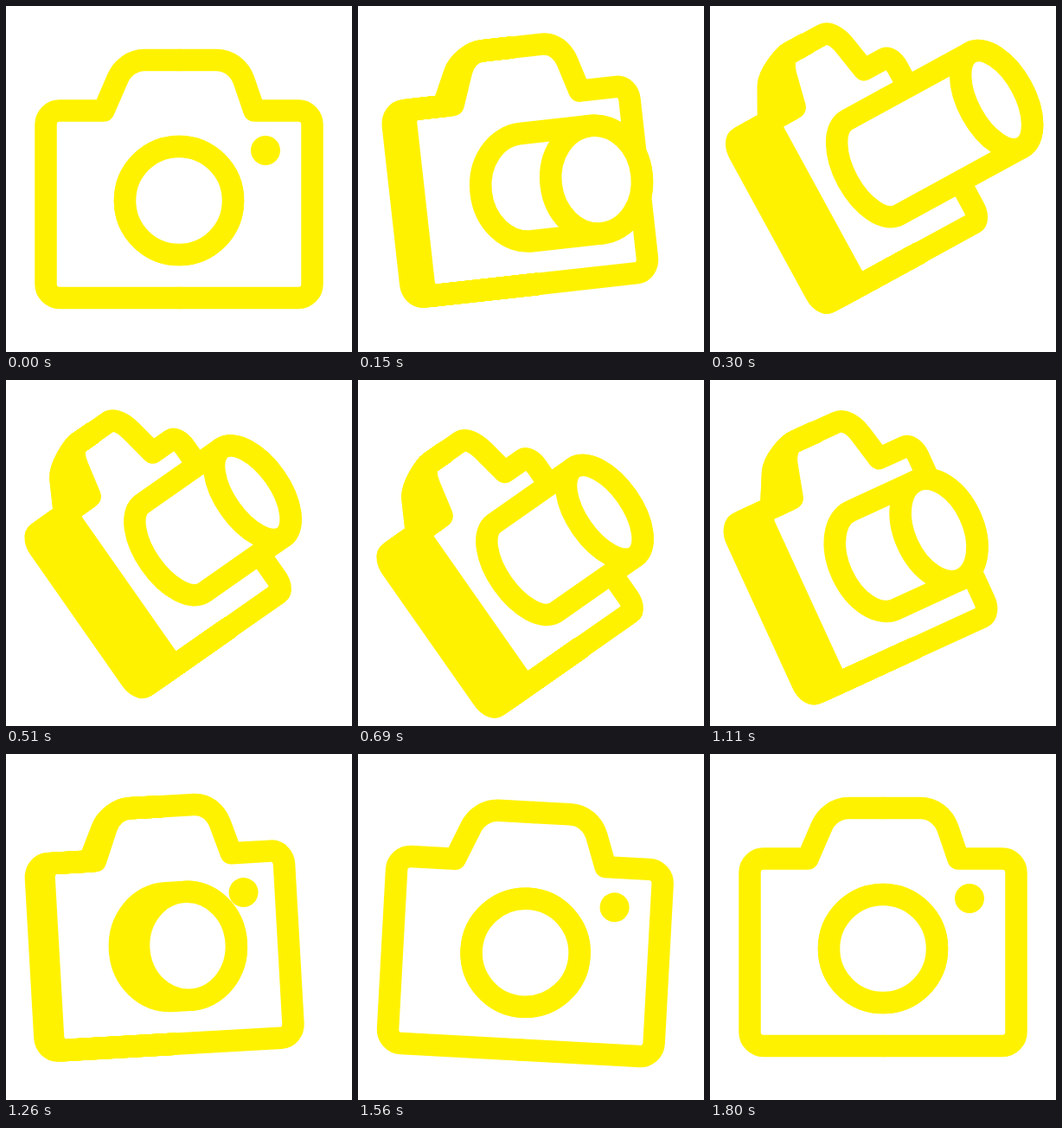
An HTML page with a canvas for the animation above (1830 ms loop, 400 by 400 pixels).

```html
<!DOCTYPE html>
<html lang="en">
<head>
<meta charset="utf-8">
<title>Camera</title>
<style>
  html, body { margin: 0; width: 100%; height: 100%; overflow: hidden; background: #fff; }
  canvas { display: block; width: 100vw; height: 100vh; }
</style>
</head>
<body>
<canvas id="stage" width="400" height="400"></canvas>
<script>
const g = document.getElementById('stage').getContext('2d');
const LOOP = 1830, STEP = 30;
const YELLOW = '#fff200', WHITE = '#fff', LINE = 25.5;

// Halves of the body outline, centred on (200, 229)
const rightHalf = 'M200 62.5H243C258 62.5 270 72 275 86L287 121H338' +
  'A16 16 0 0 1 354 137V321.5A16 16 0 0 1 338 337.5H200';

// Going back by s moves the body sideways fully, the hump less towards its top
const leftHalf = s => `M200 62.5H160C146 62.5 ${134 - .4 * s} 72 ${129 - .5 * s} 84
  L${113 - .75 * s} 121H${62 - s}A16 16 0 0 0 ${46 - s} 137
  V321.5A16 16 0 0 0 ${62 - s} 337.5H200`;

const ease = t => t < .5 ? .5 * (2 * t) ** 2.5 : 1 - .5 * (2 - 2 * t) ** 2.5;

function pose(time) {
  const span = (from, to) => ease(Math.min(1, Math.max(0, (time - from) / (to - from))));
  return {
    angle: -35 * span(0, 450) + 38.8 * span(900, 1440) - 3.8 * span(1440, 1800),
    turn: span(0, 360) - span(900, 1450),
    lens: 163 * span(0, 300) - 51 * span(300, 480) - 112 * span(900, 1450),
    x: 200 - 10 * span(0, 300) + 5.4 * span(300, 510) - 7.4 * span(900, 1260) + 12 * span(1340, 1800),
    y: 229 - 39 * span(0, 330) + 33 * span(340, 800) - 17.5 * span(800, 900)
      + 28.7 * span(900, 1480) - 5.2 * span(1480, 1800)
  };
}

function draw(time) {
  const { angle, turn, lens, x, y } = pose(time);
  const squeeze = 1 - .4925 * turn, depth = 48.5 * turn;

  g.setTransform(1, 0, 0, 1, 0, 0);
  g.fillStyle = WHITE;
  g.fillRect(0, 0, 400, 400);
  g.translate(x, y);
  g.rotate(angle * Math.PI / 180);
  g.strokeStyle = YELLOW;
  g.lineWidth = LINE;
  g.lineJoin = g.lineCap = 'round';

  // The squeeze changes the outline but not its line weight
  const outline = path => {
    const p = new Path2D();
    p.addPath(new Path2D(path), new DOMMatrix([squeeze, 0, 0, 1, -200 * squeeze, -229]));
    g.stroke(p);
  };
  outline(rightHalf);
  for (let d = 0; d < depth; d += 2) outline(leftHalf(d / squeeze));
  outline(leftHalf(depth / squeeze));

  g.fillStyle = YELLOW;
  g.beginPath();
  g.arc(100 * squeeze, -62, 17, 0, 7);
  g.fill();

  const arc = (cx, from, to) =>
    g.ellipse(cx, -4, 62.5 * squeeze, 62.5, 0, from * Math.PI, to * Math.PI);
  const paint = () => { g.closePath(); g.fill(); g.stroke(); };
  g.fillStyle = WHITE;
  g.beginPath();
  arc(0, .5, 1.5);
  arc(lens, -.5, .5);
  paint();
  g.beginPath();
  arc(lens, 0, 2);
  paint();
}

function tick() {
  draw(Math.floor(performance.now() % LOOP / STEP) * STEP);
  requestAnimationFrame(tick);
}
tick();
</script>
</body>
</html>
```
